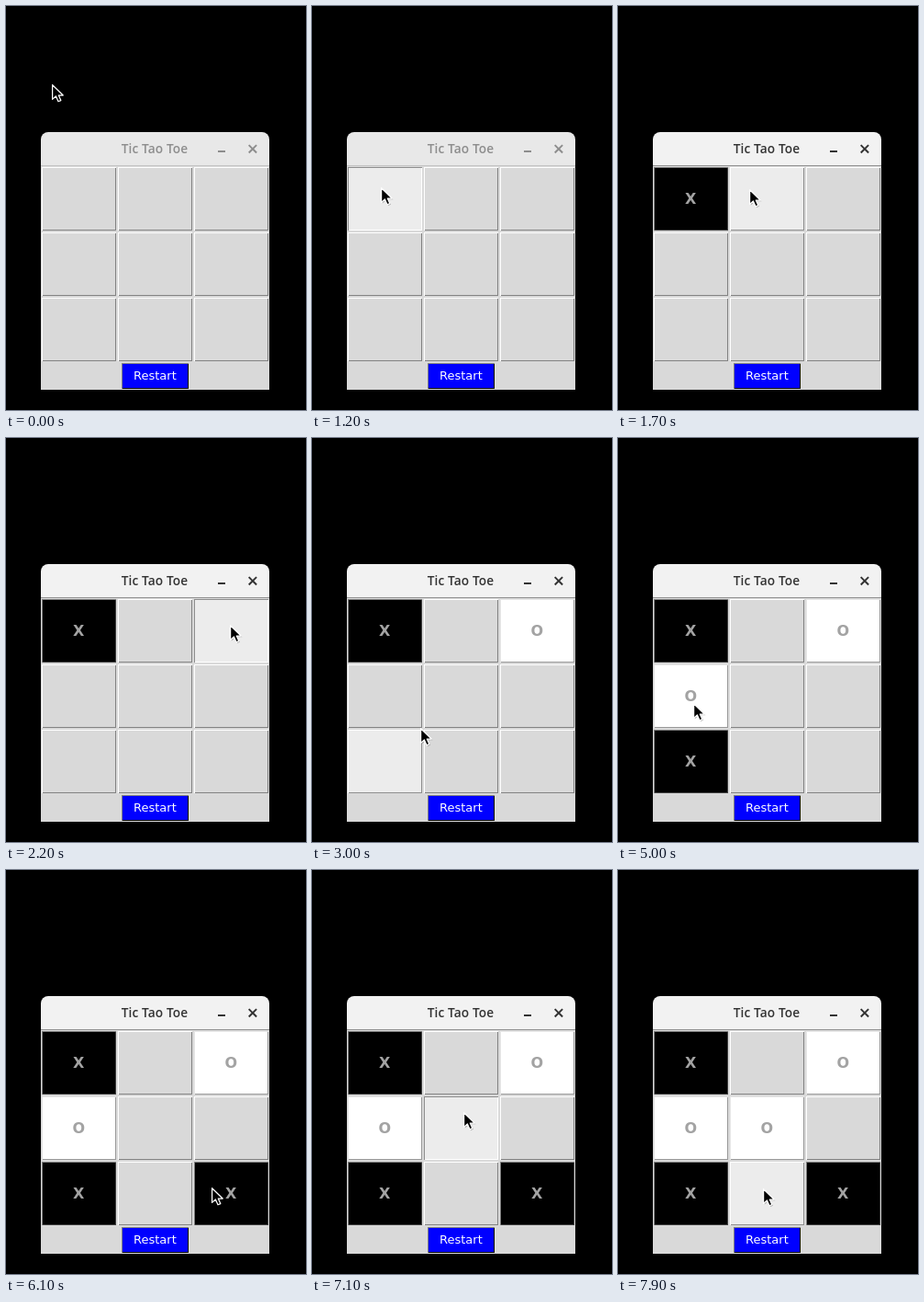
An HTML page for the animation above (8 s loop, 327 by 439 pixels).

```html
<!DOCTYPE html>
<html lang="en">
<head>
<meta charset="utf-8">
<title>Tic Tao Toe</title>
<style>
  html, body { margin: 0; width: 100%; height: 100%; overflow: hidden; background: #000; }
  svg { display: block; width: 327px; height: 439px; }
  text { white-space: pre; }
  .title { font: 600 13.7px "Open Sans", "Noto Sans", sans-serif; text-anchor: middle; letter-spacing: .1px; }
  .mark { font: bold 16px "DejaVu Sans", sans-serif; fill: #a3a3a3; text-anchor: middle; }
  .label { font: 13px "DejaVu Sans", sans-serif; fill: #fff; }
  #buttons { shape-rendering: crispEdges; }
</style>
</head>
<body>
<svg viewBox="0 0 327 439" xmlns="http://www.w3.org/2000/svg">
  <rect width="327" height="439" fill="#000"/>
  <path id="header" d="M38 174V145a8 8 0 0 1 8-8H279a8 8 0 0 1 8 8V174Z"/>
  <rect id="rule" x="38" y="173" width="249" height="1"/>
  <rect x="38" y="174" width="249" height="243" fill="#d9d9d9"/>
  <g id="controls">
    <text class="title" x="162" y="160">Tic Tao Toe</text>
    <rect x="231" y="157" width="8" height="2"/>
    <path d="M264.7 152.3l.7-.7 3.5 3.5 3.5-3.5 1.4 1.4-3.5 3.5 3.5 3.5-1.4 1.4-3.5-3.5-3.5 3.5-1.4-1.4 3.5-3.5-3.5-3.5z" transform="translate(0 -1.2)"/>
  </g>
  <g id="buttons"></g>
  <text class="label" x="139" y="406">Restart</text>
  <g id="cursor" stroke-linejoin="round">
    <path d="M1.8 1.8V17.6L5.6 14.2L8.2 20L11 18.8L8.5 13.2H13.5Z" fill="#000" opacity=".25"/>
    <path d="M.6 .7V16.4L4.4 13L7 18.8L9.8 17.6L7.3 12H12.2Z" fill="#000" stroke="#fff" stroke-width="1.25"/>
  </g>
</svg>
<script>
const LOOP = 8000, STEP = 100, LEFT = 38, TOP = 174, CELL_W = 83, CELL_H = 71;
const byId = id => document.getElementById(id);
const gray = v => `rgb(${[v, v, v].map(Math.round)})`;
const lerp = (a, b, k) => a + (b - a) * k;

// Pointer path: first step's time, number of steps, end point
const home = [50, 85];
const legs = [
  [100, 1, 47, 79], [600, 1, 64, 130], [800, 1, 75, 197],
  [1600, 5, 244, 203],
  [2700, 4, 118, 315], [3100, 1, 84, 359],
  [4300, 3, 82, 288],
  [5400, 4, 224, 345],
  [6800, 3, 165, 263],
  [7700, 3, 158, 346]
];

function pointer(t) {
  let [x, y] = home;
  for (const [begin, steps, toX, toY] of legs) {
    if (t < begin) break;
    const k = Math.min(1, (Math.floor((t - begin) / STEP) + 1) / steps);
    x = Math.round(lerp(x, toX, k));
    y = Math.round(lerp(y, toY, k));
  }
  return [x, y];
}

function cellAt([x, y]) {
  const col = Math.floor((x + 1 - LEFT) / CELL_W), row = Math.floor((y + 1 - TOP) / CELL_H);
  return col >= 0 && col < 3 && row >= 0 && row < 3 ? row * 3 + col : -1;
}

// Players alternate; each click lands on the cell under the pointer
const HOLD = 200;
const clicks = [1200, 2200, 3400, 4800, 5900, 7100].map((time, i) => (
  { time, cell: cellAt(pointer(time)), mark: 'XO'[i % 2] }
));

// Bevel colours follow from the face brightness
function bevel(v) {
  return {
    face: gray(v),
    light: gray(v > 242 ? v * 0.9 : Math.min(255, Math.max(v * 1.4, (255 + v) / 2))),
    dark: gray(v < 10 ? 63 : v * 0.6)
  };
}

const hover = bevel(236);
const skins = {
  idle: bevel(217), hover, X: bevel(0), O: bevel(255),
  pressed: { face: hover.face, light: hover.dark, dark: hover.light },
  restart: { face: '#00f', light: '#828282', dark: '#000' }
};

function add(tag, attrs) {
  const el = document.createElementNS('http://www.w3.org/2000/svg', tag);
  for (const key in attrs) el.setAttribute(key, attrs[key]);
  return byId('buttons').appendChild(el);
}

function makeButton(x, y, width, height) {
  const parts = {
    dark: add('rect', { x, y, width, height }),
    light: add('path', { d: `M${x} ${y}h${width}l-1 1h${2 - width}v${height - 2}l-1 1Z` }),
    face: add('rect', { x: x + 1, y: y + 1, width: width - 2, height: height - 2 })
  };
  return skin => {
    for (const name in parts) parts[name].setAttribute('fill', skin[name]);
  };
}

const cells = Array.from({ length: 9 }, (_, i) => {
  const x = LEFT + (i % 3) * CELL_W, y = TOP + Math.floor(i / 3) * CELL_H;
  const paint = makeButton(x + 1, y + 1, CELL_W - 2, CELL_H - 2);
  const label = add('text', { class: 'mark', x: x + 41.2, y: y + 41 });
  return { paint, label };
});
makeButton(126, 388, 73, 28)(skins.restart);

function stateOf(i, hovered, t) {
  const click = clicks.find(c => c.cell === i && t >= c.time);
  if (click) return t < click.time + HOLD ? 'pressed' : click.mark;
  return i === hovered ? 'hover' : 'idle';
}

// The window gains focus in stepped fades after the first click
function paintHeader(t) {
  const elapsed = Math.floor((t - clicks[0].time) / STEP) * STEP;
  const focus = Math.min(1, Math.max(0, elapsed / HOLD));
  byId('header').setAttribute('fill', gray(lerp(232, 242, focus)));
  byId('rule').setAttribute('fill', gray(lerp(196, 146, focus)));
  byId('controls').setAttribute('fill', gray(lerp(141, 51, focus)));
}

function draw(t) {
  const pos = pointer(t), hovered = cellAt(pos);
  paintHeader(t);
  cells.forEach((cell, i) => {
    const state = stateOf(i, hovered, t);
    cell.paint(skins[state]);
    cell.label.textContent = state.length === 1 ? state : '';
  });
  byId('cursor').setAttribute('transform', `translate(${pos})`);
}

const start = performance.now();
function tick() {
  draw((performance.now() - start) % LOOP);
  requestAnimationFrame(tick);
}
tick();
</script>
</body>
</html>
```
